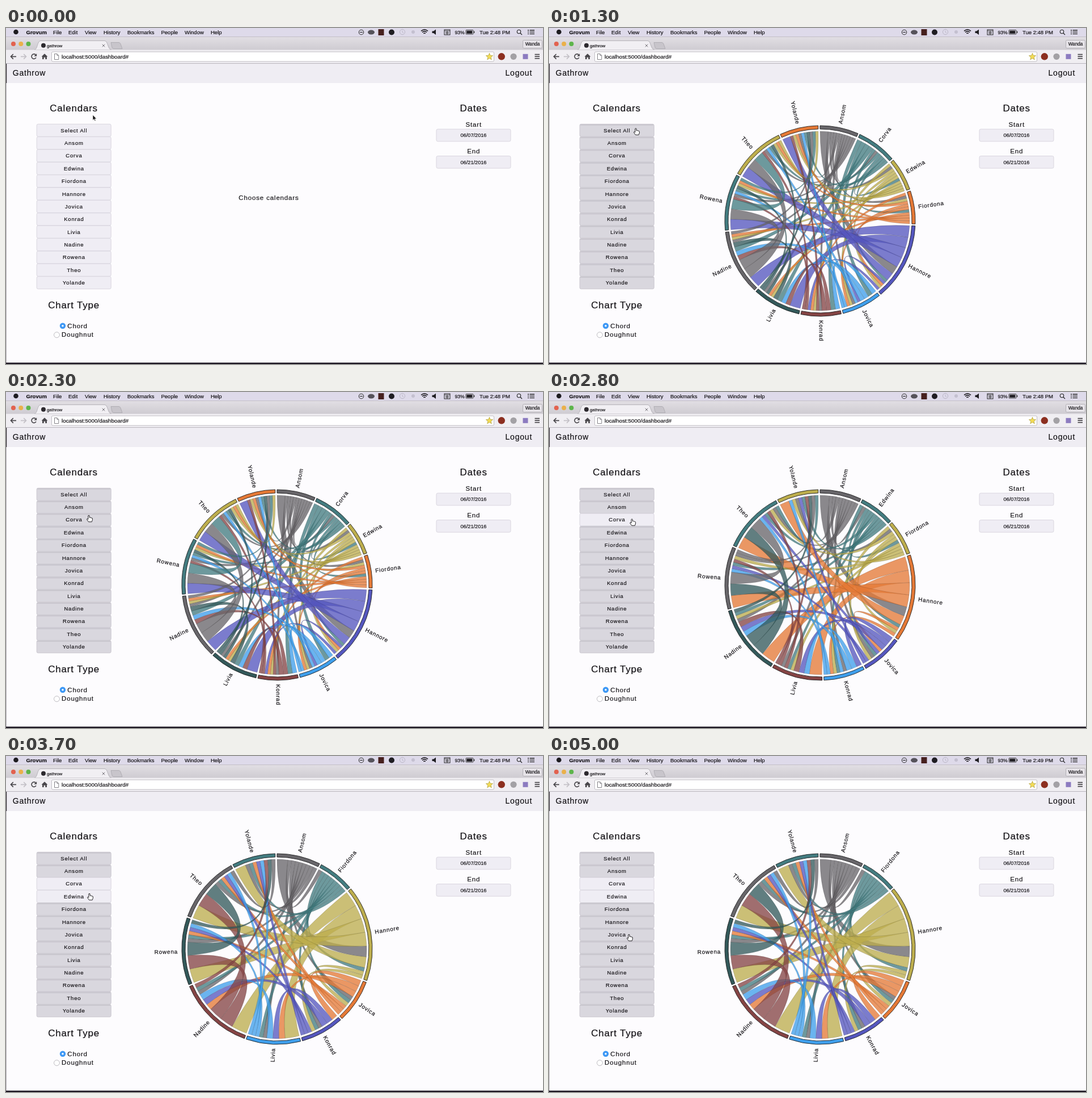
Write an HTML page that moves like this. It is 947x592 px and loops after 5100 ms.

```html
<!DOCTYPE html>
<html lang="en">
<head>
<meta charset="utf-8">
<title>Calendar chords</title>
<style>
  html, body { margin: 0; width: 100%; height: 100%; overflow: hidden; background: #fdfcfe; }
  svg { display: block; width: 100vw; height: 100vh; }
  text { font-family: "Liberation Sans", Arial, sans-serif; fill: #121014; stroke: #121014; stroke-width: .18; white-space: pre; }
  .mid { text-anchor: middle; }
  .menu { font-size: 9.5px; }
  .h1 { font-size: 14px; letter-spacing: .8px; }
  .h2 { font-size: 17px; letter-spacing: .8px; }
  .p { font-size: 11.5px; letter-spacing: .85px; }
  .btn { font-size: 9.5px; letter-spacing: .8px; }
  .date { font-size: 9.2px; }
  .label { font-size: 10px; letter-spacing: .8px; }
  .box { fill: #efedf4; stroke: #d9d6df; }
  .on .box { fill: #d9d7de; stroke: #cac7cf; }
  .shade { fill: none; }
  .on .shade { fill: #c6c3cb; }
  .arc { stroke: #1c1c1e; stroke-width: .9; }
  .chord { fill-opacity: .77; stroke: #000; stroke-width: .25; stroke-opacity: .55; }
</style>
</head>
<body>
<svg id="stage" viewBox="0 0 947 592" preserveAspectRatio="none"></svg>
<script>
const LOOP = 5100, TICK = 100;
const NAMES = ['Ansom', 'Corva', 'Edwina', 'Fiordona', 'Hannore', 'Jovica',
  'Konrad', 'Livia', 'Nadine', 'Rowena', 'Theo', 'Yolande'];
const COLORS = ['#68666a', '#437c80', '#bdae4d', '#e57936', '#5557bf', '#3f9fec', '#854444', '#33595a'];
const CX = 478, CY = 340, PAD = .02;

const stage = document.getElementById('stage');
const text = (x, y, s, cls, extra = '') => `<text x="${x}" y="${y}" class="${cls}" ${extra}>${s}</text>`;
const rect = (x, y, w, h, fill, extra = '') =>
  `<rect x="${x}" y="${y}" width="${w}" height="${h}" fill="${fill}" ${extra}/>`;
const dot = (x, y, r, fill, extra = '') => `<circle cx="${x}" cy="${y}" r="${r}" fill="${fill}" ${extra}/>`;
const line = (d, color = '#2b2a2d', w = 1.2) =>
  `<path d="${d}" fill="none" stroke="${color}" stroke-width="${w}"/>`;

// ---- meeting weights between two people
const BUSY = [8, 9, 10], TEAM = [1, 5, 6, 7, 8], LEAD = 4;
const LEAD_WITH = { 0: 6.9, 7: 9.2, 8: 10.1, 9: 9, 10: 8.9, 11: 6.9 };
function weight(a, b) {
  if (a === b) return 0;
  const both = set => set.includes(a) && set.includes(b);
  if (a === LEAD || b === LEAD) return LEAD_WITH[a + b - LEAD] || 2.45;
  if (both(BUSY)) return both([9, 10]) ? 8.5 : 8.8;
  return both(TEAM) ? 3.9 : 2.45;
}

// Quicksort with short runs sorted stably; the order of ties matters here.
function quickSort(a, cmp, from = 0, to = a.length) {
  if (to - from <= 10) {
    a.splice(from, to - from, ...a.slice(from, to).sort(cmp));
    return;
  }
  const third = from + ((to - from) >> 1);
  let v0 = a[from], v1 = a[to - 1], v2 = a[third];
  if (cmp(v0, v1) > 0) [v0, v1] = [v1, v0];
  if (cmp(v0, v2) >= 0) [v0, v1, v2] = [v2, v0, v1];
  else if (cmp(v1, v2) > 0) [v1, v2] = [v2, v1];
  a[from] = v0;
  a[to - 1] = v2;
  let low = from + 1, high = to - 1;
  a[third] = a[low];
  a[low] = v1;
  const swap = (i, j) => { [a[i], a[j]] = [a[j], a[i]]; };
  scan: for (let i = low + 1; i < high; i++) {
    let order = cmp(a[i], v1);
    if (order > 0) {
      do {
        if (--high === i) break scan;
        order = cmp(a[high], v1);
      } while (order > 0);
      swap(i, high);
    }
    if (order < 0) swap(i, low++);
  }
  quickSort(a, cmp, from, low);
  quickSort(a, cmp, high, to);
}

// ---- chord diagram
const polar = (r, a) => `${(r * Math.sin(a)).toFixed(2)},${(-r * Math.cos(a)).toFixed(2)}`;
const sweep = (r, a, b, dir = 1) => `A${r},${r} 0 ${b - a > Math.PI ? 1 : 0} ${dir} ${polar(r, dir ? b : a)}`;

function diagram(people) {
  const n = people.length, spans = [], groups = [];
  const w = (i, j) => weight(people[i], people[j]);
  const ids = people.map((_, i) => i);
  const total = ids.reduce((s, i) => s + ids.reduce((q, j) => q + w(i, j), 0), 0);
  const k = (2 * Math.PI - PAD * n) / total;
  let angle = 0;
  for (const i of ids) {
    const order = ids.slice(), start = angle;
    quickSort(order, (a, b) => w(i, b) - w(i, a));
    spans[i] = [];
    for (const j of order) spans[i][j] = [angle, angle += w(i, j) * k];
    groups[i] = [start, angle];
    angle += PAD;
  }
  let arcs = '', chords = '', labels = '';
  for (const i of ids) {
    const color = COLORS[i % COLORS.length], [a, b] = groups[i], mid = (a + b) / 2;
    arcs += `<path class="arc" fill="${color}" d="M${polar(168, a)}${sweep(168, a, b)}L${polar(162, b)}${sweep(162, a, b, 0)}Z"/>`;
    const flip = mid > Math.PI;
    labels += text(0, 0, NAMES[people[i]], 'label',
      `dy=".35em" text-anchor="${flip ? 'end' : 'start'}" transform="rotate(${mid * 180 / Math.PI - 90}) translate(175 0)${flip ? ' rotate(180)' : ''}"`);
    for (let j = i + 1; j < n; j++) {
      const [s0, s1] = spans[i][j], [t0, t1] = spans[j][i], r = 158;
      chords += `<path class="chord" fill="${color}" d="M${polar(r, s0)}${sweep(r, s0, s1)}Q0,0 ${polar(r, t0)}${sweep(r, t0, t1)}Q0,0 ${polar(r, s0)}Z"/>`;
    }
  }
  return `<g class="view" transform="translate(${CX} ${CY})">${arcs}${chords}${labels}</g>`;
}

// ---- static parts
function menuBar() {
  const items = [['File', 83], ['Edit', 110], ['View', 139], ['History', 172], ['Bookmarks', 214],
    ['People', 273.5], ['Window', 315], ['Help', 361]];
  return rect(0, 0, 947, 15, '#dedaea') + dot(17.5, 7, 4.3, '#1d1b20')
    + text(35.5, 10.5, 'Grovum', 'menu', 'font-weight="bold"')
    + items.map(([s, x]) => text(x, 10.5, s, 'menu')).join('')
    + dot(626.5, 7.5, 4.2, 'none', 'stroke="#333" stroke-width="1.1"') + line('M624 7.5H629')
    + '<ellipse cx="644" cy="7.5" rx="6" ry="4" fill="#55525a"/>'
    + rect(656.5, 2, 10, 11, '#46201e') + dot(680, 7.5, 5, '#1f1d22')
    + dot(699, 7, 4.6, 'none', 'stroke="#bbb7c6"') + line('M699 4.5V7.3L701 8.5', '#bbb7c6', 1)
    + dot(718, 7, 3, '#c4c0d0')
    + line('M732 5.4Q738 .3 744 5.4M734 7.6Q738 4.2 742 7.6M736.2 9.8Q738 8.2 739.8 9.8', '#1f1d22', 1.5)
    + '<path d="M751.5 5.5H754L758 2.5V12L754 9H751.5Z" fill="#1f1d22"/>'
    + rect(773, 3, 10, 9, 'none', 'stroke="#222"') + line('M773 5H783M775 7.5H781M775 9.7H781M778 5V12', '#333', .9)
    + text(791.5, 10.5, '93%', '', 'font-size="8.6"')
    + rect(811, 3.5, 13, 7.5, 'none', 'rx="1" stroke="#333" stroke-width=".9"')
    + rect(812.3, 4.8, 10, 5, '#1f1d22') + rect(825, 5.5, 1.3, 3.5, '#333')
    + text(835, 10.5, 'Tue 2:48 PM', 'menu', 'id="clock"')
    + dot(904.5, 6.5, 3.2, 'none', 'stroke="#222" stroke-width="1.1"') + line('M907 9L910 12')
    + line('M920 4H922M923.5 4H932M920 7.2H922M923.5 7.2H932M920 10.4H922M923.5 10.4H932', '#222', 1.3);
}

function browser() {
  return rect(0, 15, 947, 24, 'url(#strip)') + line('M0 15.5H947', '#bbb7c0', .8)
    + dot(13, 28, 4, '#e2624f') + dot(26.3, 28, 4, '#eab04a') + dot(39.5, 28, 4, '#5db54b')
    + '<path d="M50 38.5C56 38 55 22.5 61 22.5H174C180 22.5 179 38 186 38.5Z" fill="#f1eff3" stroke="#aaa7ae" stroke-width=".8"/>'
    + '<path d="M185 25.5H199Q201 25.5 202 28L205 36.5H190Q188 36.5 187 34Z" fill="#c8c5cb" stroke="#a9a6ad" stroke-width=".8"/>'
    + rect(0, 38.5, 947, 24, '#f0eef2')
    + dot(66, 30.7, 4, '#2c292e') + text(72, 33.5, 'gathrow', '', 'font-size="7.7"')
    + line('M169.7 28.7L174.3 33.3M174.3 28.7L169.7 33.3', '#77747a', 1)
    + rect(911.5, 21.5, 34, 14, '#e6e3e8', 'rx="2" stroke="#a9a6ad" stroke-width=".8"')
    + text(928.5, 31.3, 'Wanda', 'mid', 'font-size="8.2"')
    + line('M18 50.3H8.5M12.8 46L8.5 50.3L12.8 54.6', '#4a484c', 1.7)
    + line('M26 50.3H35.5M31.2 46L35.5 50.3L31.2 54.6', '#c4c1c7', 1.7)
    + line('M53 52.2A4.2 4.2 0 1 1 52.3 47.2', '#4a484c', 1.7) + '<path d="M54.2 45V49.8H49.4Z" fill="#4a484c"/>'
    + '<path d="M62.5 50.5L68 45.2L73.5 50.5H72V55H69.3V51.8H66.7V55H64V50.5Z" fill="#4a484c"/>'
    + rect(80.5, 42, 780, 17, '#fff', 'rx="2" stroke="#b9b6bd" stroke-width=".9"')
    + '<path d="M85.5 45.5H90L92.8 48.3V55.5H85.5ZM90 45.5V48.3H92.8" fill="#fff" stroke="#77747a" stroke-width=".9"/>'
    + text(98, 54, 'localhost:5000/dashboard#', '', 'font-size="9.85"')
    + '<path d="M852.5 44.3L854.2 48.4L858.6 48.7L855.2 51.5L856.3 55.8L852.5 53.4L848.7 55.8L849.8 51.5L846.4 48.7L850.8 48.4Z" fill="#f3dc55" stroke="#a8983a" stroke-width=".7"/>'
    + dot(873.8, 50.3, 6.2, '#8c2f20') + dot(895, 50.3, 5.6, '#a3a1a5') + rect(911.5, 45.8, 9, 9, '#8c7bc0')
    + line('M932.5 46.7H941M932.5 50.2H941M932.5 53.7H941', '#4a484c', 1.7)
    + line('M0 62.5H947', '#b8b5bc', 1);
}

function button(y, h, label) {
  return `<g class="toggle">${rect(54.2, y, 131, h, '', 'class="box" rx="2.5"')}`
    + `${rect(55, y + .8, 129.4, 1.5, '', 'class="shade" rx="1"')}${text(119.9, y + 14.4, label, 'btn mid')}</g>`;
}

function page() {
  const field = (y, label, value) => text(824.8, y - 4.2, label, 'p mid')
    + rect(759, y, 131, 21.6, '', 'class="box" rx="2.5"') + text(824.5, y + 14.1, value, 'date mid');
  return rect(0, 63, 947, 34, '#efedf3')
    + text(11.7, 84.3, 'Gathrow', 'h1') + text(880.5, 84.3, 'Logout', 'h1')
    + text(119.6, 146.8, 'Calendars', 'h2 mid') + text(824.6, 146.8, 'Dates', 'h2 mid')
    + ['Select All', ...NAMES].map((s, i) => button(169.3 + 22.37 * i, 22, s)).join('')
    + text(119.6, 494, 'Chart Type', 'h2 mid')
    + dot(100, 524.8, 5.2, '#3d98f5') + dot(100, 524.8, 1.7, '#fff') + text(108.3, 528.5, 'Chord', 'p')
    + dot(89.5, 540.7, 4.9, '#fff', 'stroke="#b3b0b7" stroke-width=".9"') + text(98, 544.4, 'Doughnut', 'p')
    + field(178.2, 'Start', '06/07/2016') + field(225.5, 'End', '06/21/2016')
    + rect(0, 63, 1.2, 34, '#29262c') + rect(0, 97, 1, 493, '#b5b2b9') + rect(0, 589.6, 947, 2.4, '#1c1622');
}

const everyone = NAMES.map((_, i) => i);
stage.innerHTML = `<defs><linearGradient id="strip" x2="0" y2="1">
  <stop stop-color="#e2dfe4"/><stop offset="1" stop-color="#cecbd1"/></linearGradient></defs>`
  + rect(0, 0, 947, 592, '#fdfcfe') + menuBar() + browser() + page()
  + `<g class="view">${text(463.5, 303.4, 'Choose calendars', 'p mid')}</g>`
  + diagram(everyone)
  + diagram(everyone.filter(i => i !== 1))
  + diagram(everyone.filter(i => i !== 1 && i !== 2))
  + `<path id="arrow" d="M0 0V9.6L2.2 7.6L3.7 11L5.2 10.3L3.7 7.1H6.6Z" fill="#111" stroke="#fff" stroke-width=".7"/>
  <path id="hand" d="M-1.1 .9Q0 -.4 1.1 .9V4.2Q2.3 3.4 3 4.5Q4.2 3.8 4.8 5Q6.2 4.5 6.4 6V8.5L5.2 11.8H-.4L-3.3 7.8Q-3.7 6.2 -2.2 6.4L-1.1 7.4Z" fill="#fff" stroke="#1a181c" stroke-width=".95" stroke-linejoin="round"/>`;

// ---- timeline
const PATH = [[0, 153, 153], [200, 153, 153], [800, 153, 176.5], [1700, 153, 176.5], [2200, 146, 217],
  [2700, 146, 217], [3000, 147, 242], [4100, 147, 242], [4300, 147, 271.5], [4500, 147, 271.5], [5000, 141, 314]];
const CLICKS = [1300, 2600, 3600];
const PRESS = 900, MINUTE = 4600;

const views = stage.querySelectorAll('.view');
const toggles = stage.querySelectorAll('.toggle');
const clock = stage.querySelector('#clock');
const arrow = stage.querySelector('#arrow');
const hand = stage.querySelector('#hand');
const show = (node, on) => node.setAttribute('visibility', on ? 'visible' : 'hidden');

function cursorAt(t) {
  const i = PATH.findIndex((p, k) => k + 1 === PATH.length || t < PATH[k + 1][0]);
  const [t0, x0, y0] = PATH[i], [t1, x1, y1] = PATH[i + 1] || [t0 + 1, x0, y0];
  const u = (t - t0) / (t1 - t0), e = u * u * (3 - 2 * u);
  return [x0 + (x1 - x0) * e, y0 + (y1 - y0) * e];
}

function render(t) {
  const state = CLICKS.filter(c => t >= c).length;
  views.forEach((v, i) => show(v, i === state));
  toggles.forEach((b, i) => {
    const on = i === 0 ? t >= PRESS
      : state > 0 && !(i === 2 && state > 1) && !(i === 3 && state > 2);
    b.classList.toggle('on', on);
  });
  const [x, y] = cursorAt(t), overButton = y > 169;
  show(arrow, !overButton);
  show(hand, overButton);
  (overButton ? hand : arrow).setAttribute('transform', `translate(${x} ${y})`);
  clock.textContent = t >= MINUTE ? 'Tue 2:49 PM' : 'Tue 2:48 PM';
}

let begin = null;
function frame(now) {
  if (begin === null) begin = now;
  const t = Math.max(0, now - begin) % LOOP;
  render(Math.floor(t / TICK) * TICK);
  requestAnimationFrame(frame);
}
render(0);
requestAnimationFrame(frame);
</script>
</body>
</html>
```
